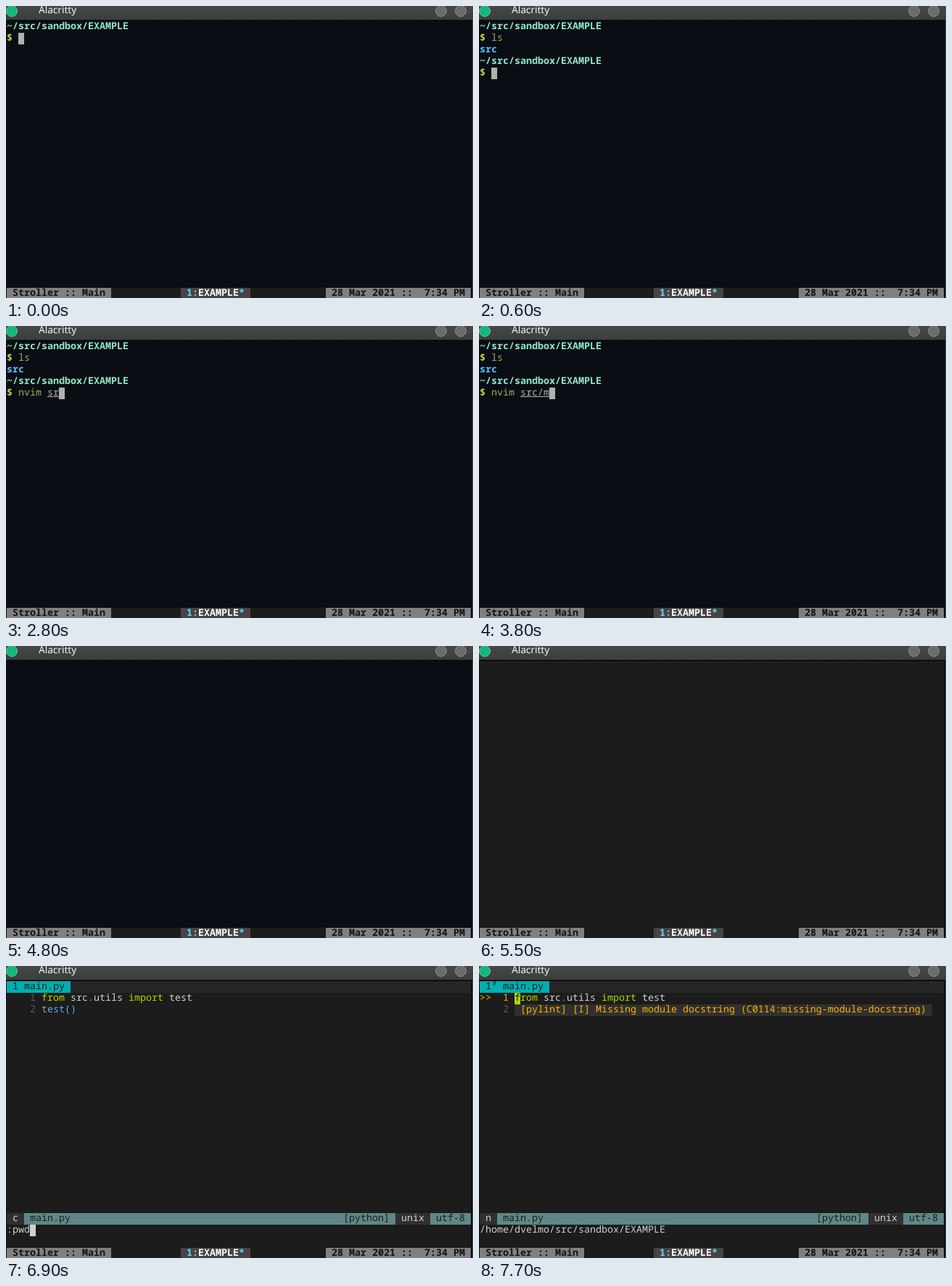
An HTML page for the animation above (8000 ms loop, 644 px wide and 403 px high).

```html
<!DOCTYPE html>
<html lang="en">
<head>
<meta charset="utf-8">
<title>Terminal session</title>
<style>
  html, body { margin: 0; width: 100%; height: 100%; overflow: hidden; background: #0a0e14; }
  svg { display: block; width: 644px; height: 403px; }
  text { white-space: pre; text-rendering: geometricPrecision; font-variant-ligatures: none; }
  .cells text { font: 13.3333px "Noto Sans Mono", "DejaVu Sans Mono", monospace; }
  .cells .bold { font-weight: 700; }
  .title { font: 500 13.6px "Noto Sans", "Open Sans", sans-serif; }
</style>
</head>
<body>
<svg viewBox="0 0 644 403" xmlns="http://www.w3.org/2000/svg">
  <defs>
    <linearGradient id="bar" x1="0" y1="0" x2="0" y2="1">
      <stop offset="0" stop-color="#444846"/>
      <stop offset="1" stop-color="#3a3f3d"/>
    </linearGradient>
  </defs>
  <rect width="644" height="403" fill="#0a0e14"/>
  <rect width="644" height="19" fill="url(#bar)"/>
  <rect x="643" y="19" width="1" height="384" fill="#393e3d"/>
  <circle cx="8" cy="7" r="7.5" fill="#17b57f" stroke="#54c79f"/>
  <circle cx="600" cy="7" r="7.5" fill="#6b6c6a" stroke="#8a8b89"/>
  <circle cx="627" cy="7" r="7.5" fill="#6b6c6a" stroke="#8a8b89"/>
  <text class="title" x="45" y="10" fill="#f3f4f2">Alacritty</text>
  <g id="screen" class="cells"></g>
  <g id="status" class="cells"></g>
</svg>
<script>
const LOOP = 8000, CELL = 8, LINE = 16, LEFT = 1, TOP = 21;

const SHELL = {
  fg: '#b3b1ad', path: '#95e6cb', prompt: '#c2d94c',
  command: '#91b362', unknown: '#f07178', dir: '#59c2ff'
};
const EDITOR = {
  bg: '#1c1c1c', fg: '#d0d0d0', keyword: '#afd700', call: '#5fafd7',
  number: '#585858', tab: '#00afaf', fill: '#262626', bar: '#5f8787',
  panel: '#303030', warn: '#ffaf00'
};

// [start time, text on the second prompt]
const TYPING = [
  [600, ''], [2100, 'n'], [2300, 'nvi'], [2400, 'nvim'], [2600, 'nvim '],
  [2700, 'nvim s'], [2800, 'nvim sr'], [2900, 'nvim src/'],
  [3800, 'nvim src/m'], [4000, 'nvim src/main.py ']
];
const SCENES = [0, 300, 400, ...TYPING.map(step => step[0]),
  4600, 4800, 5500, 5800, 6300, 6900, 7300, 7700];

const escapeText = s => s.replace(/&/g, '&amp;').replace(/</g, '&lt;').replace(/>/g, '&gt;');

function block(row, col, cols, color, rows = 1) {
  return `<rect x="${LEFT + col * CELL}" y="${TOP + row * LINE}" width="${cols * CELL}" height="${rows * LINE}" fill="${color}"/>`;
}

function put(row, col, text, color, { bold = false, bg = '', underline = false } = {}) {
  const x = LEFT + col * CELL, y = TOP + row * LINE + 11;
  const back = bg ? block(row, col, text.length, bg) : '';
  const rule = underline
    ? `<rect x="${x}" y="${y + 1}" width="${text.length * CELL}" height="1" fill="${color}"/>` : '';
  return `${back}<text x="${x}" y="${y}" fill="${color}"${bold ? ' class="bold"' : ''}>${escapeText(text)}</text>${rule}`;
}

const BOLD = { bold: true };

function prompt(row) {
  return put(row, 0, '~/src/sandbox/EXAMPLE', SHELL.path, BOLD) +
         put(row + 1, 0, '$', SHELL.prompt, BOLD);
}

function commandLine(row, text, known) {
  const [word, ...rest] = text.split(' ');
  const arg = rest.join(' ').trimEnd();
  const ok = known.includes(word);
  return put(row, 2, word, ok ? SHELL.command : SHELL.unknown, { bold: !ok }) +
    (arg ? put(row, 3 + word.length, arg, SHELL.fg, { underline: true }) : '');
}

function shell(t) {
  const known = ['ls', 'nvim'];
  const cursor = (row, col) => block(row, col, 1, SHELL.fg);
  const first = t < 300 ? '' : t < 400 ? 'l' : 'ls';
  let out = prompt(0) + commandLine(1, first, known);
  if (t < 600) return out + cursor(1, 2 + first.length);

  const typed = TYPING.filter(step => step[0] <= t).pop()[1];
  out += put(2, 0, 'src', SHELL.dir, BOLD) + prompt(3) + commandLine(4, typed, known);
  return out + (t < 4600 ? cursor(4, 2 + typed.length) : cursor(5, 0));
}

function editor(t) {
  const c = EDITOR;
  let out = block(0, 0, 80, c.bg, 23);
  if (t < 5800) return out;

  const linted = t >= 7700;
  const typing = t >= 6300 && t < 7300;
  const bar = { bg: c.bar }, panel = { bg: c.panel };

  out += block(0, 0, 80, c.fill) +
    put(0, 0, linted ? ' 1³ main.py ' : ' 1 main.py ', c.bg, { bg: c.tab }) +
    put(1, 4, '1', linted ? c.warn : c.number) +
    put(1, 6, 'from', c.keyword) +
    put(1, 11, 'src', c.fg) + put(1, 14, '.', c.call) + put(1, 15, 'utils', c.fg) +
    put(1, 21, 'import', c.keyword) + put(1, 28, 'test', c.fg) +
    put(2, 4, '2', c.number);

  out += linted
    ? put(1, 0, '>>', c.warn) +
      put(2, 6, ' [pylint] [I] Missing module docstring (C0114:missing-module-docstring) ', c.warn, panel)
    : put(2, 6, 'test()', c.call);

  out += block(20, 3, 64, c.bar) +
    put(20, 0, typing ? ' c ' : ' n ', c.fg, panel) +
    put(20, 4, 'main.py', c.bg) + put(20, 58, '[python]', c.bg) +
    put(20, 67, ' unix ', c.fg, panel) + put(20, 73, ' utf-8 ', c.bg, bar);

  if (typing) {
    const entry = t < 6900 ? ':' : ':pwd';
    return out + put(21, 0, entry, c.fg) + block(21, entry.length, 1, c.fg);
  }
  if (t >= 7300) out += put(21, 0, '/home/dvelmo/src/sandbox/EXAMPLE', c.fg);
  return out + put(1, 6, 'f', c.bg, { bg: c.keyword });
}

function statusLine() {
  const side = { bold: true, bg: '#808080' }, accent = '#5fd7ff';
  return block(23, 0, 80, '#1c1c1c') +
    put(23, 0, ' Stroller :: Main ', '#121212', side) +
    block(23, 30, 12, '#444444') +
    put(23, 31, '1', accent, BOLD) + put(23, 32, ':', '#b2b2b2', BOLD) +
    put(23, 33, 'EXAMPLE', '#ffffff', BOLD) + put(23, 40, '*', accent, BOLD) +
    put(23, 55, ' 28 Mar 2021 ::  7:34 PM ', '#121212', side);
}

const screenGroup = document.getElementById('screen');
document.getElementById('status').innerHTML = statusLine();
let shown = -1;

function draw(t) {
  const scene = SCENES.filter(start => start <= t).pop();
  if (scene === shown) return;
  shown = scene;
  screenGroup.innerHTML = t < 4800 ? shell(t) : t < 5500 ? '' : editor(t);
}

const began = performance.now();
function tick() {
  draw((performance.now() - began) % LOOP);
  requestAnimationFrame(tick);
}
tick();
</script>
</body>
</html>
```
